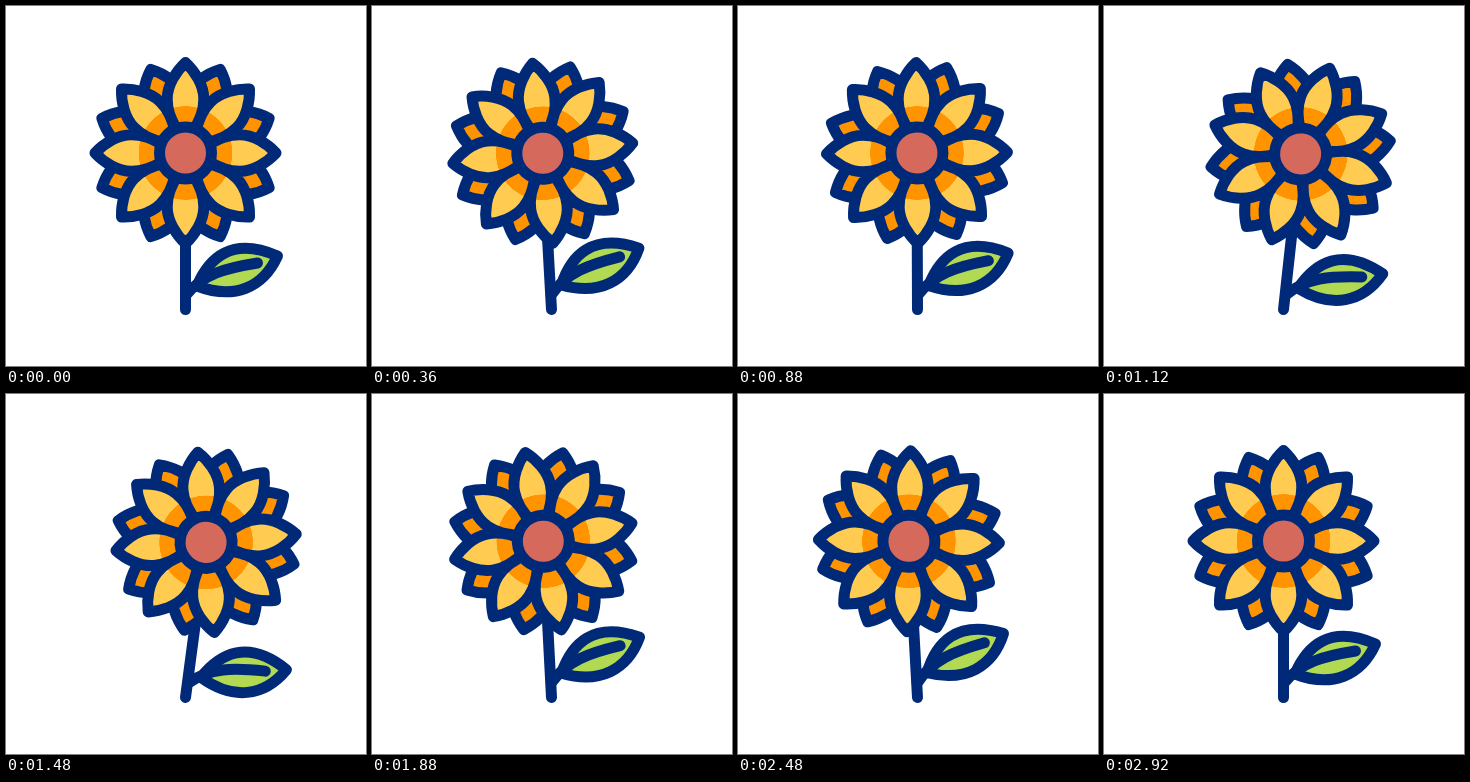
Animation, 360 px wide and 360 px high, one loop 3000 ms. Source, as an HTML page:

```html
<!DOCTYPE html>
<html lang="en">
<head>
<meta charset="utf-8">
<title>Swaying sunflower</title>
<style>
  html, body { margin: 0; width: 100%; height: 100%; overflow: hidden; background: #fff; }
  svg { display: block; width: 100vw; height: 100vh; }
  .ink { stroke: #002a78; stroke-width: 11; stroke-linecap: round; stroke-linejoin: round; fill: none; }
  #leaf .blade { fill: #b1d952; }
  #back { fill: #ff9300; }
  #front { fill: url(#petal); }
  #heart { fill: #d4695c; }
</style>
</head>
<body>
<svg viewBox="0 0 360 360">
  <defs>
    <radialGradient id="petal" gradientUnits="userSpaceOnUse" cx="0" cy="0" r="100">
      <stop offset=".465" stop-color="#ff9300"/>
      <stop offset=".47" stop-color="#ffcb50"/>
    </radialGradient>
  </defs>
  <g id="plant">
    <path class="ink" d="M179.5 303.5V150"/>
    <g id="leaf">
      <path class="ink blade" d="M191 280C203 252 226 230 271.5 250C257 282 228 294 191 280Z"/>
      <path class="ink" d="M180 289C197 268 220 262 251.5 257"/>
    </g>
    <g transform="translate(179.5 147)">
      <path id="back" class="ink"/>
      <path id="front" class="ink"/>
      <circle id="heart" class="ink" r="26"/>
    </g>
  </g>
</svg>
<script>
const LOOP = 3000, STEP = 40;
const $ = id => document.getElementById(id);

// Key poses: [time in ms, angle in degrees]
const SWAY = [[120, 0], [555, -5.5], [1335, 8.8], [2115, -6.1], [2860, 0]];
const SPIN = [[120, 0], [600, -6.5], [1755, 38.2], [2680, 0]];
const LEAF_LAG = 60, BACK_LAG = 75;

// Ring of eight petals, each w wide on either side of its axis
function petals(first, w) {
  let d = "";
  for (let i = 0; i < 8; i++) {
    const a = (first + i * 45) * Math.PI / 180;
    const at = (x, r) => [x * Math.cos(a) + r * Math.sin(a), x * Math.sin(a) - r * Math.cos(a)]
      .map(v => v.toFixed(2)).join(" ") + " ";
    const half = s => `M${at(0, 90.5)}C${at(s * w / 2, 82)}${at(s * w, 68)}${at(s * w, 54)}`;
    const side = `S${at(w * 0.7, 32)}${at(w * 0.45, 22)}`;
    d += half(1) + side + `L${at(-w * 0.45, 22)}`
      + `C${at(-w * 0.7, 32)}${at(-w, 40)}${at(-w, 54)}`
      + `S${at(-w / 2, 82)}${at(0, 90.5)}Z`;
  }
  return d;
}

// Sine easing from pose to pose
function pose(keys, t) {
  const next = keys.findIndex(([time]) => t < time);
  if (next < 1) return 0;
  const [t0, a] = keys[next - 1], [t1, b] = keys[next];
  return a + (b - a) * (1 - Math.cos(Math.PI * (t - t0) / (t1 - t0))) / 2;
}

function turn(id, angle, x = 0, y = 0) {
  $(id).setAttribute("transform", `rotate(${angle.toFixed(3)} ${x} ${y})`);
}

function draw(t) {
  turn("plant", pose(SWAY, t), 179.5, 303.5);
  turn("leaf", pose(SWAY, t - LEAF_LAG) * 0.92, 180, 289);
  turn("front", pose(SPIN, t));
  turn("back", pose(SPIN, t - BACK_LAG));
}

$("back").setAttribute("d", petals(22.5, 20.5));
$("front").setAttribute("d", petals(0, 18.3));

const start = performance.now();
function tick() {
  const t = (performance.now() - start) % LOOP;
  draw(Math.floor(t / STEP) * STEP);
  requestAnimationFrame(tick);
}
tick();
</script>
</body>
</html>
```
